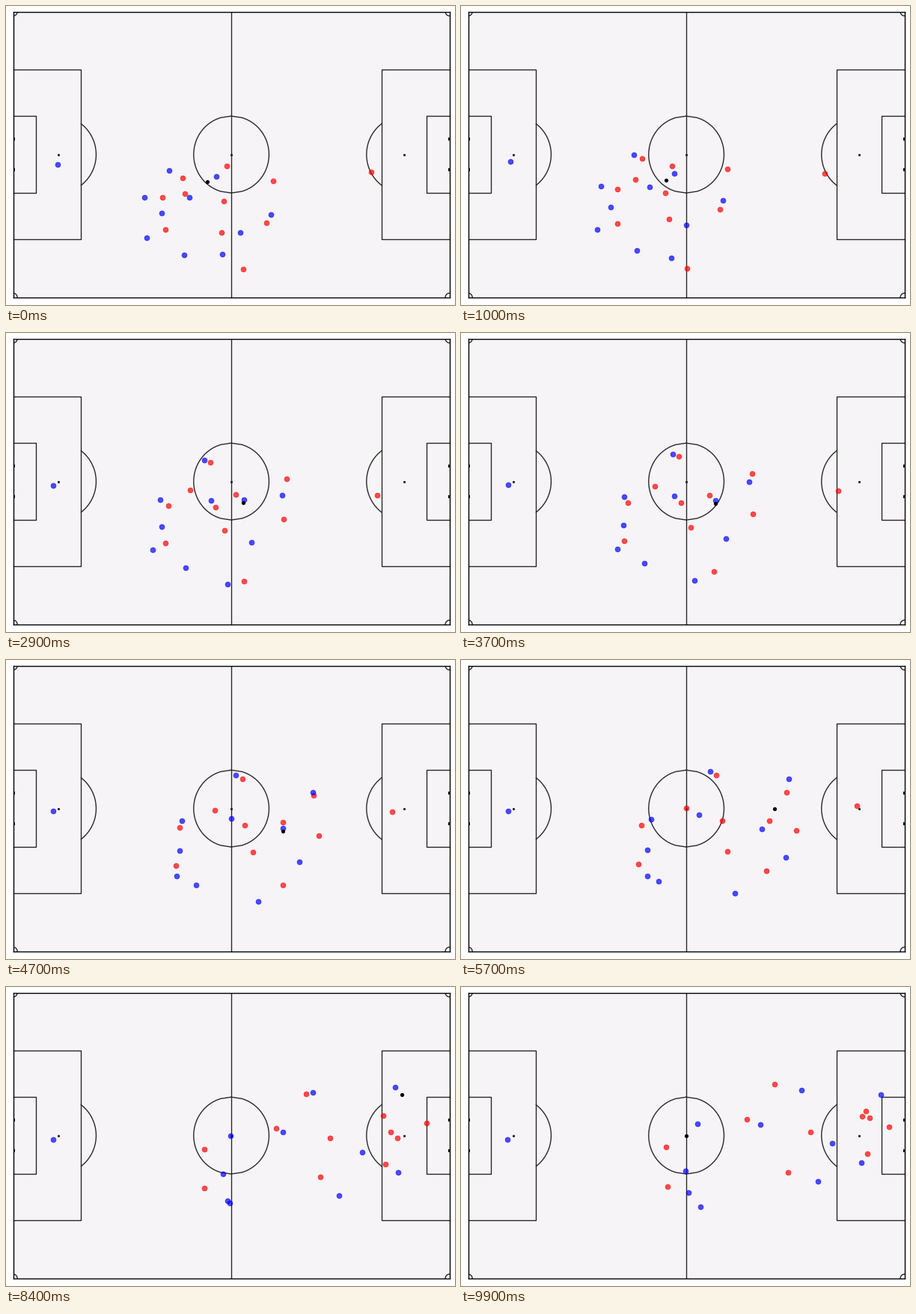
A matplotlib script for the animation above (10 s loop, 600x400 px).

```python
import matplotlib.pyplot as plt
import numpy as np
from matplotlib.animation import FuncAnimation

W, H, DPI = 600, 400, 100
FRAMES, INTERVAL = 100, 100
PT = 72 / DPI  # points per pixel

# Pitch in metres, mapped to the stage
LENGTH, WIDTH = 106, 68
LEFT, RIGHT, TOP, BOTTOM = 9.6, 592.6, 7.6, 389.8
RADIUS, SPOT = 9.15, 11
LINE = "#242424"

fig = plt.figure(figsize=(W / DPI, H / DPI), dpi=DPI, facecolor="white")
ax = fig.add_axes([LEFT / W, 1 - BOTTOM / H, (RIGHT - LEFT) / W, (BOTTOM - TOP) / H])
ax.set(xlim=(-LENGTH / 2, LENGTH / 2), ylim=(-WIDTH / 2, WIDTH / 2),
       xticks=[], yticks=[], facecolor="#f6f4f7")
for spine in ax.spines.values():
    spine.set(linewidth=1.4 * PT, color="black", zorder=4)


def line(x, y):
    ax.plot(x, y, color=LINE, lw=1.35 * PT, zorder=1)


def dot(x, y, size=3.2, marker="o", color=LINE):
    ax.plot(x, y, marker, color=color, ms=size * PT, mew=0, zorder=1)


def box(side, depth, width):
    goal = side * LENGTH / 2
    inner = goal - side * depth
    line([goal, inner, inner, goal], [-width / 2, -width / 2, width / 2, width / 2])


def draw_pitch():
    line([0, 0], [-WIDTH / 2, WIDTH / 2])
    dot(0, 0)
    u = np.linspace(-1, 1, 50)
    y = u * RADIUS
    x = np.sqrt(RADIUS**2 - y**2)
    line(x, y)
    line(-x, y)

    arc_y = u * np.sqrt(RADIUS**2 - 5.5**2)
    arc_x = SPOT + np.sqrt(RADIUS**2 - arc_y**2)
    corner = np.linspace(0, 1, 50)
    corner_x = np.sqrt(1 - corner**2)
    for side in (-1, 1):
        goal = side * LENGTH / 2
        box(side, 5.5, 18.3)
        box(side, 16.5, 40.3)
        dot(goal - side * SPOT, 0)
        line(goal - side * arc_x, arc_y)
        dot([goal, goal], [-3.66, 3.66], 4.8, "s", "black")
        for end in (-1, 1):
            line(goal - side * corner_x, end * (WIDTH / 2 - corner))


draw_pitch()

# Everything that moves lives in stage pixels
stage = fig.add_axes([0, 0, 1, 1])
stage.set(xlim=(0, W), ylim=(H, 0))
stage.axis("off")

clock = np.arange(FRAMES) * INTERVAL / 1000
KEYS = (0, 3.7, 7.2, 9.9)  # seconds at which each run is pinned
movers = []


def add_mover(path, **style):
    marker, = stage.plot([], [], "o", **style)
    movers.append((marker, path))


def run(color, *points):
    """A player on the cubic curve through four points."""
    path = np.vander(clock, 4) @ np.polyfit(KEYS, points, 3)
    add_mover(path, color=color, alpha=0.7, ms=6.9 * PT, mew=0.7 * PT)
    return path


def red(*points):
    return run("red", *points)


def blue(*points):
    return run("blue", *points)


# Keeper first, then the outfield players
red((488, 222), (504, 211), (549, 185), (572, 187))
red((236, 230), (291, 165), (377, 149), (419, 130))
red((239, 251), (259, 205), (336, 194), (382, 177))
red((209, 256), (223, 227), (255, 219), (274, 214))
red((213, 299), (218, 278), (253, 271), (276, 267))
red((291, 261), (294, 227), (397, 208), (467, 194))
red((295, 214), (332, 217), (474, 207), (541, 166))
red((288, 303), (307, 260), (395, 255), (437, 248))
red((357, 234), (389, 188), (474, 173), (536, 173))
red((348, 290), (390, 242), (493, 216), (546, 175))
red((317, 352), (338, 319), (466, 255), (543, 223))

blue((69, 212), (63, 203), (63, 203), (62, 204))
blue((218, 220), (283, 162), (375, 144), (455, 138))
blue((185, 256), (218, 219), (281, 207), (316, 183))
blue((208, 277), (217, 257), (274, 252), (300, 246))
blue((188, 310), (209, 289), (279, 289), (304, 275))
blue((238, 333), (245, 308), (283, 290), (320, 294))
blue((245, 256), (285, 218), (346, 200), (400, 184))
blue((289, 332), (312, 331), (411, 294), (477, 260))
blue((313, 303), (354, 275), (491, 256), (535, 235))
dribbler = blue((281, 228), (340, 224), (447, 225), (496, 209))
winger = blue((354, 279), (385, 199), (484, 139), (561, 144))


def ball_path():
    """Pass to the dribbler, pass to the wing, shot, then the centre spot."""
    at_feet = np.array([0, 4])
    goal = np.full_like(winger, 188)
    goal[:, 0] = 590
    stages = [
        (0, np.zeros_like(winger) + (269, 235)),
        (3.0, dribbler + at_feet), (5.1, dribbler + at_feet),
        (6.4, winger + at_feet), (8.3, winger + at_feet),
        (9.1, goal),
    ]
    path = np.zeros_like(winger) + (301, 199)
    for (t0, a), (t1, b) in zip(stages, stages[1:]):
        now = (clock >= t0) & (clock <= t1)
        s = (clock[now, None] - t0) / (t1 - t0)
        path[now] = a[now] + (b[now] - a[now]) * s
    return path


add_mover(ball_path(), color="black", ms=5.2 * PT, mew=0)


def update(i):
    for marker, path in movers:
        marker.set_data([path[i, 0]], [path[i, 1]])
    return [marker for marker, _ in movers]


anim = FuncAnimation(fig, update, frames=FRAMES, interval=INTERVAL, repeat=True, repeat_delay=0)
plt.show()
```
